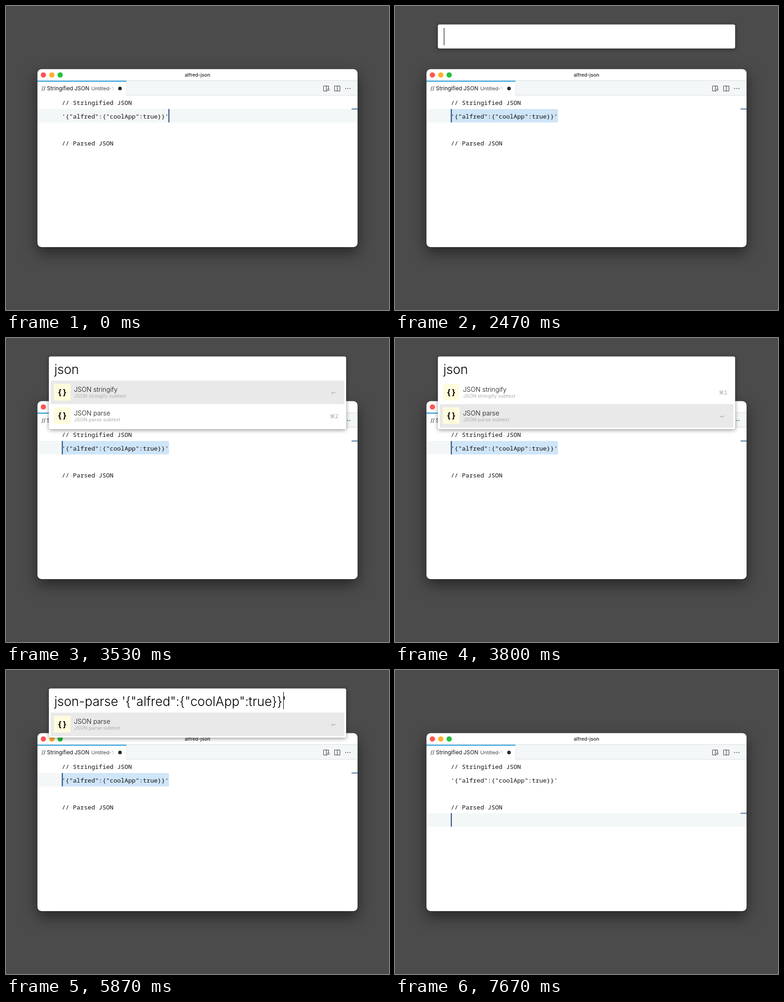
An HTML page that plays this animation: 840x667 px, repeating every 8 s.

```html
<!DOCTYPE html>
<html lang="en">
<head>
<meta charset="utf-8">
<title>JSON launcher</title>
<style>
  html, body { margin: 0; width: 100%; height: 100%; overflow: hidden; background: #4b4b4b; }
  svg { display: block; width: 840px; height: 667px; }
  text { font-family: Inter, "Open Sans", sans-serif; font-optical-sizing: none; white-space: pre; }
  .code { font: 13.47px "Noto Sans Mono", monospace; fill: #111; }
  .code tspan { fill: #c4c8ca; }
  .window { filter: drop-shadow(0 12px 16px rgba(0, 0, 0, .5)); }
  .panel { filter: drop-shadow(0 2px 5px rgba(0, 0, 0, .42)); }
  .query { font-size: 28px; font-weight: 300; }
  .name { font-size: 14.2px; font-weight: 300; fill: #111; }
  .sub { font-size: 10.6px; font-weight: 500; fill: #b7b7b7; }
  .key { font: 11.5px "DejaVu Sans", Inter, sans-serif; fill: #a5a5a5; text-anchor: end; }
  .braces { font: 600 18px "Noto Sans Mono", monospace; text-anchor: middle; }
</style>
</head>
<body>
<svg viewBox="0 0 840 667">
  <defs>
    <linearGradient id="fade">
      <stop offset="0" stop-color="#fff" stop-opacity="0"/>
      <stop offset="1" stop-color="#fff"/>
    </linearGradient>
  </defs>
  <rect class="window" x="69" y="138.5" width="702" height="390.5" rx="9" fill="#fff"/>

  <circle cx="82" cy="151.3" r="5.8" fill="#fe5650"/>
  <circle cx="100.5" cy="151.3" r="5.8" fill="#fdb02a"/>
  <circle cx="118.8" cy="151.3" r="5.8" fill="#22c139"/>
  <text x="420" y="155" font-size="10.7" font-weight="500" text-anchor="middle" fill="#222">alfred-json</text>

  <path d="M69 163.5H771V196.5H69Z" fill="#f3f7f8"/>
  <path d="M69 163.5H771M264 196H771" stroke="#dadee0"/>
  <path d="M69 164H264V197H69Z" fill="#fff"/>
  <path d="M264 164V196" stroke="#e2e6e7"/>
  <path d="M69 165H264" stroke="#1f9bdd" stroke-width="2"/>
  <text x="78" y="185" font-size="11.8" fill="#111">// Stringified JSON</text>
  <text x="187" y="185" font-size="10.8" fill="#444">Untitled-1</text>
  <rect x="226" y="172" width="12" height="18" fill="url(#fade)"/>
  <circle cx="250" cy="181" r="4" fill="#2b2b2b"/>
  <g fill="none" stroke="#333">
    <path d="M704 186.5H696.5V175.5H707.5V181M702.5 175.5V186.5M705 185.5L703 187.5"/>
    <circle cx="707" cy="183.5" r="2"/>
    <path d="M720.5 175.5H732.5V186.5H720.5ZM726.5 175.5V186.5"/>
  </g>
  <g fill="#333">
    <circle cx="745" cy="181" r="1"/>
    <circle cx="749.7" cy="181" r="1"/>
    <circle cx="754.4" cy="181" r="1"/>
  </g>

  <g id="marks"></g>
  <text class="code" x="122.5" y="217">//<tspan>·</tspan>Stringified<tspan>·</tspan>JSON</text>
  <text class="code" x="122.5" y="246.5">'{"alfred":{"coolApp":true}}'</text>
  <text class="code" x="122.5" y="305.5">//<tspan>·</tspan>Parsed<tspan>·</tspan>JSON</text>
  <g id="launcher"></g>
</svg>
<script>
const LOOP = 8000, ROW = 51.6;
const SELECT = 470, OPEN = 2330, COMPLETE = 4200, CLOSE = 5930, MOVE = 6930;
const marks = document.getElementById('marks');
const launcher = document.getElementById('launcher');

const stringify = ['JSON stringify', 'JSON stringify subtext'];
const parse = ['JSON parse', 'JSON parse subtext'];
const both = [stringify, parse];
const files = ['jobs', 'journal', 'june', 'joined', 'jumps', 'january']
  .map(name => [name + '.json', '~/Documents/' + name + '.json']);

// start time, typed text, caret x, results
const queries = [
  [OPEN, '', 107.5, []],
  [2730, 'j', 113.5, [...both, ...files]],
  [2870, 'js', 128, both],
  [2930, 'jso', 145, both],
  [3000, 'json', 161.5, both],
  [COMPLETE, 'json-parse ', 254.5, [parse]],
  [4730, `json-parse '{"alfred":{"coolApp":true}}'`, 608.5, [parse]],
];

const within = (t, from, to) => t >= from && t < to;
const rect = (x, y, w, h, fill, extra = '') =>
  `<rect x="${x}" y="${y}" width="${w}" height="${h}" fill="${fill}" ${extra}/>`;
const label = (cls, x, y, text) => `<text class="${cls}" x="${x}" y="${y}">${text}</text>`;

function drawMarks(t) {
  const selected = within(t, SELECT, MOVE);
  const y = t < MOVE ? 226 : 314.3;
  const caretOn = t < 330 || t >= MOVE || selected && (t - SELECT) % 1000 < 460;
  return rect(69, y, selected ? 54 : 702, 29.4, '#f3f7f8')
    + (selected ? rect(122.5, y, 235, 29.4, '#cfe5f8', 'rx="3"') : '')
    + rect(758, y - 1, 13, 2, '#4a70a3')
    + (caretOn ? rect(t < SELECT ? 356.3 : 122.5, y, 2, 29.4, '#0b3c6c') : '');
}

function drawRow([name, sub], i, active) {
  const y = 93.5 + i * ROW, on = i === active;
  return (on ? rect(98, y, 644, ROW, '#e9e9e9') : '')
    + rect(105, y + 7, 36.5, 36.5, '#fffcdd')
    + label('braces', 123.3, y + 31, '{}')
    + label('name', 149, y + 24.5, name)
    + label('sub', 149.5, y + 37.5, sub)
    + label('key', on ? 723 : 729, y + 30.5, on ? '↩' : '⌘' + (i + 1));
}

function drawLauncher(t) {
  if (!within(t, OPEN, CLOSE)) return '';
  const [, text, caretX, rows] = queries.findLast(q => t >= q[0]);
  const active = within(t, 3800, COMPLETE) ? 1 : 0;
  const height = 52.7 + (rows.length && rows.length * ROW + 3.5);
  const caretOn = !within(t, 3530, 4070) && !within(t, 5330, 5870);
  return rect(94, 40.5, 652, height, '#fff', 'rx="4" class="panel"')
    + label('query', 106, 78.5, text)
    + (caretOn ? rect(caretX - .5, 48, 1.2, 38, '#111') : '')
    + rows.map((row, i) => drawRow(row, i, active)).join('');
}

function show(group, markup) {
  if (group.markup !== markup) group.innerHTML = group.markup = markup;
}

function frame() {
  const t = performance.now() % LOOP;
  show(marks, drawMarks(t));
  show(launcher, drawLauncher(t));
  requestAnimationFrame(frame);
}
frame();
</script>
</body>
</html>
```
